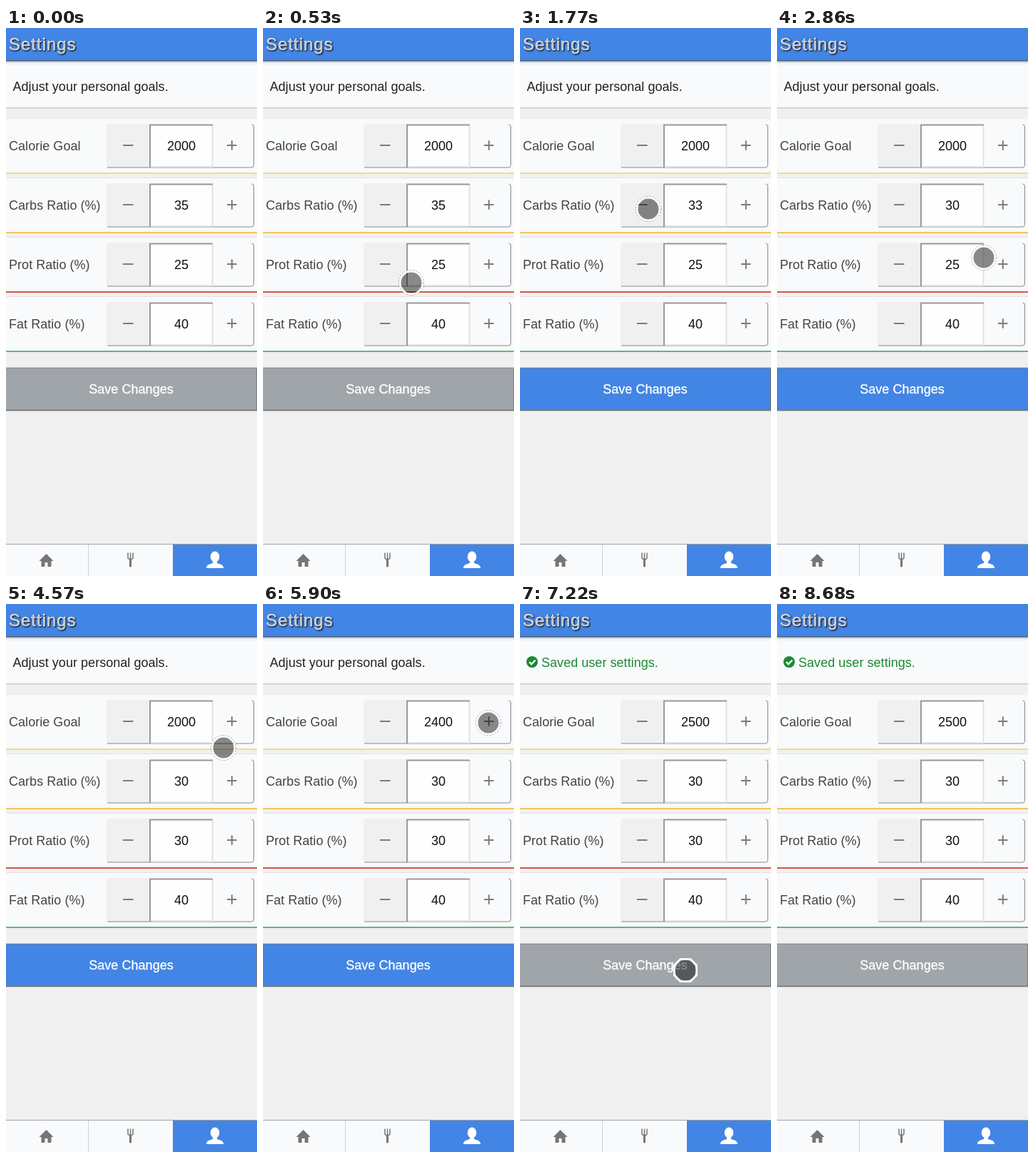
Write an HTML page that moves like this. It is 352x766 px and loops after 9000 ms.

```html
<!DOCTYPE html>
<html lang="en">
<head>
<meta charset="utf-8">
<title>Settings</title>
<style>
  html, body { margin: 0; width: 100%; height: 100%; overflow: hidden; background: #f0f0f0; }
  svg { display: block; width: 100%; height: 100%; }
  text { font: 18px "Liberation Sans", Arial, sans-serif; letter-spacing: .04px; }
  .title { font-size: 24px; letter-spacing: 1px; fill: #fff; stroke: #fff; stroke-width: .5; text-shadow: 1px 1px 2px #000; }
  .mid { text-anchor: middle; }
  .outline { fill: none; stroke: #fff; }
</style>
</head>
<body>
<svg viewBox="0 0 352 766" xmlns="http://www.w3.org/2000/svg">
  <rect width="352" height="766" fill="#f0f0f0"/>

  <rect y="46" width="352" height="2" fill="#b4b6ba"/>
  <rect width="352" height="46" fill="#4285e4"/>
  <rect y="45" width="352" height="1" fill="#38506f"/>
  <text class="title" x="4" y="31">Settings</text>

  <rect y="51" width="352" height="60" fill="#f8fafc"/>
  <rect y="111" width="352" height="1" fill="#c6c7c8"/>
  <rect y="112" width="352" height="1" fill="#e0e0e0"/>
  <text id="hint" x="9.5" y="88" fill="#222">Adjust your personal goals.</text>
  <g id="saved" fill="#1c8a30">
    <circle cx="17" cy="81" r="8"/>
    <path class="outline" d="M13 81l3 3 5.500-5.500" stroke-width="2.400"/>
    <text x="30" y="88">Saved user settings.</text>
  </g>

  <g id="rows"></g>

  <rect y="474" width="352" height="1" fill="#c4c6c8"/>
  <rect y="475" width="352" height="60" fill="#77797c"/>
  <rect y="535" width="352" height="1" fill="#cfcfcf"/>
  <rect id="save" y="475.500" width="351" height="58"/>
  <text class="mid" x="175.500" y="511" fill="#fff" stroke="#fff" stroke-width=".3">Save Changes</text>

  <rect y="721" width="352" height="45" fill="#f8fafc"/>
  <rect y="721" width="352" height="1" fill="#a0a2a4"/>
  <rect x="115" y="722" width="1" height="44" fill="#cfd1d3"/>
  <rect x="234" y="722" width="118" height="44" fill="#4285e4"/>
  <g fill="#757575">
    <path d="M56.500 735l10 10h-3v8h-5v-6h-4v6h-5v-8h-3z"/>
    <path d="M171 733.500v7q0 2 3.500 2t3.500-2v-7M174.500 733.500v19" fill="none" stroke="#757575" stroke-width="1.500"/>
    <path d="M174.500 743v9" stroke="#757575" stroke-width="3" stroke-linecap="round"/>
  </g>
  <g fill="#fff">
    <ellipse cx="293" cy="739" rx="6.300" ry="7.500"/>
    <path d="M290 744h6v4q9 2 9 6v1h-24v-1q0-4 9-6z"/>
  </g>

  <g id="pointer">
    <path class="outline" d="M-7-15.500H7L15.500-7V7L7 15.500H-7L-15.500 7V-7Z" stroke-width="3"/>
    <circle r="14.500" fill-opacity=".46"/>
    <circle id="dots" r="17.500" fill="none" stroke="#000" stroke-opacity=".35" stroke-dasharray="2 2"/>
  </g>
</svg>
<script>
const LOOP = 9000, STEP = 77;
const HIDE = 8680, SAVED = 6980;
const $ = id => document.getElementById(id);
const clamp = v => Math.min(1, Math.max(0, v));
const lerp = (a, b, p) => a + (b - a) * p;

// Each run of taps goes from first to last in the same rhythm
const RHYTHM = [0, .22, .445, .725, 1];
const rows = [
  { label: 'Calorie Goal', line: '#f6dc82', value: 2000, step: 100, first: 5030, last: 6220 },
  { label: 'Carbs Ratio (%)', line: '#f3c45c', value: 35, step: -1, first: 1470, last: 2630 },
  { label: 'Prot Ratio (%)', line: '#d0594a', value: 25, step: 1, first: 3240, last: 4340 },
  { label: 'Fat Ratio (%)', line: '#5fb878', value: 40, step: 0 }
];

const rowMarkup = (row, i) => `
  <g transform="translate(0 ${83 * i})">
    <rect y="126" width="352" height="1" fill="${i ? '#e3e3e1' : '#f0eedc'}"/>
    <rect y="127" width="352" height="75" fill="#f8fafc"/>
    <rect y="202" width="352" height="2" fill="${row.line}"/>
    <text x="4" y="171" fill="#444">${row.label}</text>
    <rect x="141" y="134" width="61" height="61" rx="3" fill="#f0f0f0"/>
    <path d="M142 195H344q3.500 0 3.500-3.500V138q0-3-3-3" fill="none" stroke="#85878a"/>
    <rect x="202" y="135" width="88" height="60" fill="#fefefe"/>
    <path d="M289.500 136V194H203" fill="none" stroke="#e2e3e4" stroke-width="2"/>
    <path d="M202 195V135.500H290" fill="none" stroke="#97999c" stroke-width="2"/>
    <path d="M164 164h14.500M310 164h13.500M316.800 157.300v13.400" stroke="#7c7c7c" stroke-width="2"/>
    <text class="mid value" x="246" y="171" fill="#111"></text>
  </g>`;
$('rows').innerHTML = rows.map(rowMarkup).join('');
const values = document.querySelectorAll('.value');

// The pointer travels from stop to stop on a bent path, slowing down by power
const home = [342, 845];
const moves = [
  { start: 70, end: 920, power: 2, bend: [261, 549], to: [180, 253] },
  { start: 2630, end: 3090, power: 2, bend: [229, 295], to: [323, 336] },
  { start: 4490, end: 4880, power: 4, bend: [281, 257], to: [316, 166] },
  { start: 6220, end: 6830, power: 1.4, bend: [316, 419], to: [232, 512] },
  { start: 8380, end: HIDE, power: 1, bend: [298, 652], to: [364, 793] }
];

function pointerAt(t) {
  const n = moves.filter(m => t >= m.start).length - 1;
  if (n < 0 || t >= HIDE) return null;
  const { start, end, power, bend, to } = moves[n];
  const from = n ? moves[n - 1].to : home;
  const gaps = Math.round((end - start) / STEP);
  const done = Math.floor((t - start + 4) / (end - start) * gaps) + 1;
  const p = 1 - (1 - clamp(done / (gaps + 1))) ** power;
  return from.map((v, i) => Math.round(lerp(lerp(v, bend[i], p), lerp(bend[i], to[i], p), p)));
}

const GREY = [160, 165, 170], BLUE = [66, 133, 228];
const fade = (t, start, length) => clamp(Math.floor((t - start) / STEP + .05) * STEP / length);

function saveColor(t) {
  const mix = fade(t, rows[1].first, 150) - fade(t, SAVED, 225);
  return `rgb(${GREY.map((g, i) => Math.round(lerp(g, BLUE[i], mix)))})`;
}

function valueAt({ value, step, first, last }, t) {
  return value + step * RHYTHM.filter(r => t >= lerp(first, last, r)).length;
}

const show = (id, on) => $(id).setAttribute('visibility', on ? 'visible' : 'hidden');

function draw(t) {
  rows.forEach((row, i) => { values[i].textContent = valueAt(row, t); });
  $('save').setAttribute('fill', saveColor(t));
  show('hint', t < SAVED);
  show('saved', t >= SAVED);

  const pos = pointerAt(t);
  show('pointer', pos);
  if (pos) {
    $('pointer').setAttribute('transform', `translate(${pos})`);
    $('dots').setAttribute('opacity', pos[1] < 470 ? 1 : 0);
  }
}

const begin = performance.now();
function tick() {
  draw((performance.now() - begin) % LOOP);
  requestAnimationFrame(tick);
}
tick();
</script>
</body>
</html>
```
